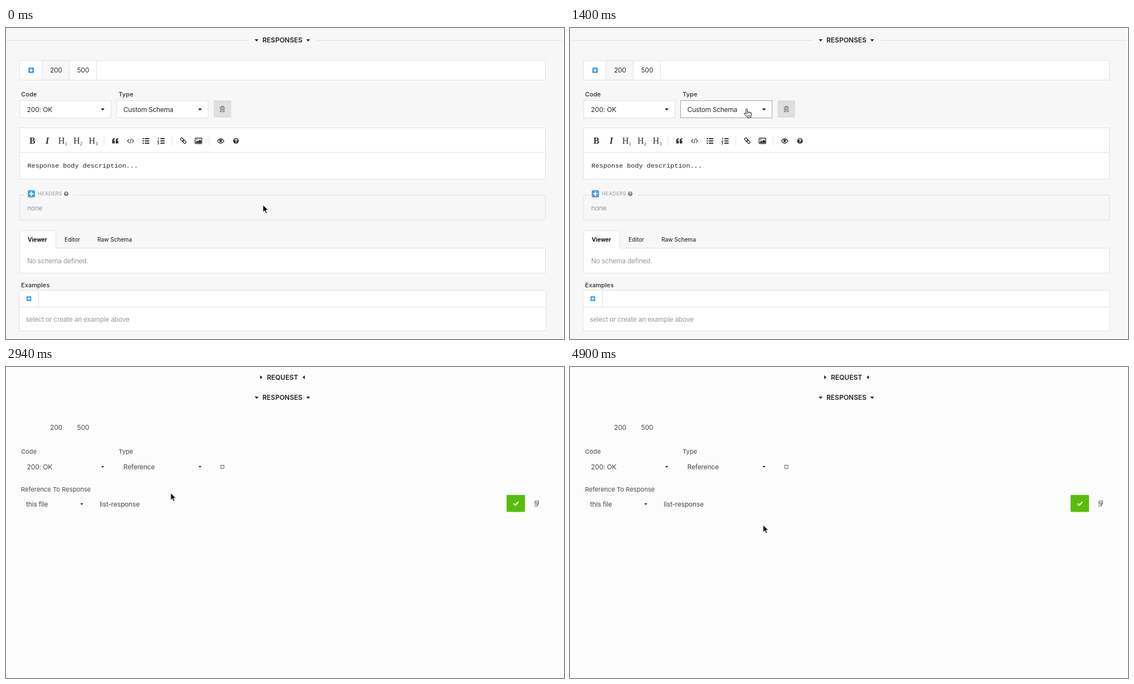
An HTML page for the animation above (4970 ms loop, 1001 by 559 pixels).

```html
<!DOCTYPE html>
<html lang="en">
<head>
<meta charset="utf-8">
<title>Response editor</title>
<style>
html, body { margin: 0; width: 100%; height: 100%; overflow: hidden; background: #f7f7f7; }
svg { display: block; width: 1001px; height: 559px; }
text { font: 12px Inter, sans-serif; letter-spacing: var(--track, -.022em); fill: var(--text, #2b2b2b); white-space: pre; }
.title { font-weight: 600; letter-spacing: 0; fill: #222; }
.label { font-size: 11px; font-weight: var(--label, 500); letter-spacing: .008em; }
.tab { font-size: 10.1px; letter-spacing: 0; fill: #111; }
.strong { font-weight: 700; fill: #111; }
.mute { fill: #999; }
.code { font: 11.8px "Liberation Mono", monospace; letter-spacing: 0; fill: #222; }
.serif { font: 16px "Liberation Serif", serif; letter-spacing: 0; fill: #2d3038; }
.tiny { font: 8px "Liberation Serif", serif; letter-spacing: 0; fill: #2d3038; }
.box { fill: #fff; stroke: #e1e1e1; }
.rule { fill: none; stroke: #e1e1e1; }
.focus { fill: #fff; stroke: #4c9fc4; stroke-width: 1.2; }
.ink { fill: #2d3038; }
.line { fill: none; stroke: #2d3038; stroke-width: 1.3; }
.white { fill: none; stroke: #fff; }
.step { opacity: 0; }
#reference { --text: #484848; --label: 400; --track: -.014em; }
</style>
</head>
<body>
<svg viewBox="0 0 1001 559">
  <defs>
    <path id="caret" d="M-3.5-2h7L0 2z" fill="#222"/>
    <g id="plus">
      <rect x="-5" y="-5" width="10" height="10" rx="1.8" fill="#4a9fe6"/>
      <path class="white" stroke-width="1.7" d="M-3 0h6M0-3v6"/>
    </g>
    <g id="help">
      <circle r="5" class="ink"/>
      <path class="white" stroke-width="1.5" d="M-1.9-1.2Q-1.7-2.9 0-2.9T1.8-1.3Q1.7-.4 0 .2V1.2M0 2.1v1.5"/>
    </g>
  </defs>

  <g id="schema">
    <rect width="1001" height="559" fill="#f7f7f7"/>
    <rect x="998" width="3" height="559" fill="#fcfcfc"/>
    <path class="rule" d="M0 22.5H435M557 22.5H998"/>

    <rect class="box" x="24.5" y="58.5" width="943" height="35"/>
    <rect x="65" y="59" width="49" height="34" fill="#f7f7f7"/>
    <path class="rule" d="M64.5 58v35M113.5 58v35M162.5 58v35"/>
    <use href="#plus" x="45" y="76"/>

    <rect class="box" x="24.5" y="130.5" width="164" height="31"/>
    <rect class="box" x="198.5" y="130.5" width="164" height="31"/>
    <rect x="372.5" y="130" width="31.5" height="31" rx="1" fill="#dfdfdf"/>
    <path fill="none" stroke="#777" stroke-width="1.2" d="M383.5 142.5h9M386.5 142v-1.5h3v1.5M384.7 142.5v8h6.6v-8M386.9 144v5M389.1 144v5"/>

    <rect class="box" x="24.5" y="179.5" width="943" height="92"/>
    <path class="rule" d="M24 223.5H968M176 194v18M297.5 194v18M364.5 194v18"/>
    <text class="serif" x="42" y="208" style="font-weight:700">B</text>
    <text class="serif" x="71" y="208" style="font-weight:700;font-style:italic">I</text>
    <g id="headings"></g>

    <path class="ink" d="M190.5 207.5v-5q0-4 4.6-4.5v2q-2 .4-2 2.5h2v5zM196.8 207.5v-5q0-4 4.6-4.5v2q-2 .4-2 2.5h2v5z"/>
    <path class="line" style="stroke-width:1.1" d="M221 200l-3.2 3 3.2 3M226 200l3.2 3-3.2 3M224.7 198.7l-2.4 8.6"/>
    <path class="line" style="stroke-width:1.9" d="M245 199h2.4M245 203h2.4M245 207h2.4M249 199h8M249 203h8M249 207h8M277 199h7.5M277 203h7.5M277 207h7.5"/>
    <path class="line" style="stroke-width:1" d="M272.5 198l1.3-.6v3M272 202.2h2l-2 2.2h2.2M272 206h2l-1 1.3q1.4 0 1 1.2t-2 .4"/>
    <g class="line" transform="translate(318 202.5) rotate(45)">
      <rect x="-6" y="-2.1" width="6.8" height="4.2" rx="2"/>
      <rect x="-.8" y="-2.1" width="6.8" height="4.2" rx="2"/>
    </g>
    <rect class="line" x="339.2" y="198" width="12" height="9.8" rx="1"/>
    <path class="ink" d="M340.5 206.8v-2l2.4-2.4 1.5 1.5 3.3-3.4 2.8 2.8v3.5z"/>
    <circle class="ink" cx="342.3" cy="200.8" r="1.1"/>
    <path class="line" d="M379.3 203q5.7-8 11.6 0-5.9 8-11.6 0z"/>
    <circle class="ink" cx="385.1" cy="202.7" r="2.4"/>
    <use href="#help" x="412.5" y="203"/>
    <text class="code" x="38.5" y="250.5">Response body description...</text>

    <path class="rule" d="M33 300.5H24.5V345.5H967.5V300.5H122"/>
    <use href="#plus" transform="translate(45.5 298) scale(1.3)"/>
    <text class="mute" x="57" y="301.3" style="font-size:9px;letter-spacing:.03em">HEADERS</text>
    <use href="#help" transform="translate(108 298) scale(.78)" opacity=".65"/>
    <text class="mute" x="38" y="327.5">none</text>

    <rect class="box" x="24.5" y="395.5" width="943" height="45"/>
    <path d="M24.5 396V364.5H89.5V396" fill="#fff" stroke="#e1e1e1"/>
    <text class="tab" x="39" y="384" style="font-weight:700">Viewer</text>
    <text class="tab" x="105" y="384">Editor</text>
    <text class="tab" x="164" y="384">Raw Schema</text>
    <text class="mute" x="38" y="423">No schema defined.</text>

    <text class="label" x="27" y="465.5">Examples</text>
    <rect class="box" x="23.5" y="471.5" width="945" height="73"/>
    <path class="rule" d="M24 501.5H968M58.5 472v29"/>
    <use href="#plus" transform="translate(41 486.5) scale(.88)"/>
    <text class="mute" x="35.5" y="527.5">select or create an example above</text>

    <rect id="hover" class="step" x="198.5" y="130.5" width="164" height="31" fill="none" stroke="#a3a3a3"/>
    <rect id="focus" class="focus step" x="198.5" y="130.5" width="164" height="31"/>
    <text x="210.5" y="150.5">Custom Schema</text>
    <use href="#caret" transform="translate(173.5 146.5) scale(.95)"/>
    <use href="#caret" transform="translate(348 146.5) scale(.95)"/>

    <g id="shared">
      <use href="#caret" x="449.5" y="22.3"/>
      <text class="title" x="460" y="26.3">RESPONSES</text>
      <use href="#caret" x="542" y="22.3"/>
      <text x="79" y="80">200</text>
      <text x="127.5" y="80">500</text>
      <text class="label" x="27" y="123.3">Code</text>
      <text class="label" x="202" y="123.3">Type</text>
      <text x="37.5" y="150.5" style="letter-spacing:-.01em">200: OK</text>
    </g>

    <g id="types" class="step">
      <rect class="focus" x="198.5" y="166.5" width="162.5" height="64" rx="1"/>
      <rect id="pick" class="step" x="199.2" y="199" width="161" height="30.7" fill="#f6f6f6"/>
      <text class="strong" x="212.5" y="188">Custom Schema</text>
      <text x="212.5" y="219">Reference</text>
    </g>
  </g>

  <g id="reference" class="step">
    <rect width="1001" height="559" fill="#fcfcfc"/>
    <use href="#caret" transform="translate(458 18.5) rotate(-90)"/>
    <text class="title" x="468" y="23">REQUEST</text>
    <use href="#caret" transform="translate(534 18.5) rotate(90)"/>
    <use href="#shared" y="33"/>
    <use href="#caret" transform="translate(173.5 179.5) scale(.75)"/>
    <use href="#caret" transform="translate(348 179.5) scale(.75)"/>
    <text x="210.5" y="183.5">Reference</text>
    <path fill="none" stroke="#666" d="M384.5 176.5h7M385.5 176.5v6h5.5v-6"/>
    <text class="label" x="27" y="224">Reference To Response</text>
    <text x="36" y="250.5">this file</text>
    <use href="#caret" transform="translate(136 246.5) scale(.75)"/>

    <g id="chosen">
      <text x="168" y="250.5">list-response</text>
      <rect x="898" y="230" width="33" height="30.5" rx="1.5" fill="#58bd0c"/>
      <path class="white" stroke-width="2.4" d="M910.8 245.5l2.8 2.8 5.6-5.8"/>
      <path fill="none" stroke="#555" stroke-width="1.1" d="M949.5 241h6l-1 3.5h-6zM948 247h6.5l1-2.5M947.5 250h5.5l1-3"/>
    </g>
    <g id="search" class="step">
      <rect x="898" y="230" width="33" height="30.5" rx="1.5" fill="#ea5541"/>
      <path class="white" stroke-width="2.8" d="M914.8 239.7v6.3M914.8 247.3v2.8"/>
      <circle cx="877.5" cy="245.5" r="3.5" class="line" style="stroke-width:1.7"/>
      <path class="line" style="stroke-width:2" d="M880 248l3.5 3.5"/>
      <text x="307" y="289.5" style="font-weight:600;letter-spacing:0;fill:#222">list-response</text>
    </g>
  </g>

  <g id="cursor">
    <path id="arrow" d="M0 0v13l3-2.8 2.2 5 2.2-1L5.2 9.300h4z" fill="#000" stroke="#fff" stroke-width=".9"/>
    <g id="hand" class="step" stroke="#111" stroke-linejoin="round">
      <path fill="#fff" d="M-1.3 7V.6Q-1.3-.6 0-.6t1.3 1.2V5q1.8-.8 2.6.4 1.8-.6 2.5.6 2-.3 2.1 1.4v2.5q0 2-1.2 3.4V15h-6.5v-1.4Q-2 12-4.6 8.4q-.4-1.4.8-1.6 1 0 2.5 2z"/>
      <path fill="none" stroke-width=".8" d="M1.3 5v3M3.9 5.4V8M6.4 6v2.3M2 10.5v2.5M4 10.5v2.5M6 10.5v2.5"/>
    </g>
  </g>
</svg>
<script>
const LOOP = 4970, TICK = 70;
const $ = id => document.getElementById(id);

$("headings").innerHTML = [1, 2, 3].map(n => {
  const x = 66.5 + 27.3 * n;
  return `<text class="serif" x="${x}" y="208">H</text><text class="tiny" x="${x + 12}" y="210.5">${n}</text>`;
}).join("");

// Shown during each [from, to) span, hidden otherwise.
function show(id, ...spans) {
  const at = t => spans.some(([a, b]) => t >= a && t < b) ? 1 : 0;
  const times = [...new Set([0, ...spans.flat(), LOOP])].sort((a, b) => a - b);
  $(id).animate(times.map(t => ({ offset: t / LOOP, opacity: at(t), easing: "step-end" })),
    { duration: LOOP, iterations: Infinity });
}

function move(id, path) {
  const keys = path.map(([t, x, y], i) => {
    const ticks = i + 1 < path.length ? (path[i + 1][0] - t) / TICK : 1;
    return { offset: t / LOOP, transform: `translate(${x}px, ${y}px)`, easing: `steps(${Math.round(ticks)}, end)` };
  });
  $(id).animate(keys, { duration: LOOP, iterations: Infinity });
}

const OPEN = 1470, SWAP = 2380, CLEAR = 3360, CHOOSE = 4480;

show("hover", [630, OPEN]);
show("focus", [OPEN, SWAP]);
show("types", [OPEN, SWAP]);
show("pick", [1960, SWAP]);
show("reference", [SWAP, LOOP]);
show("chosen", [0, CLEAR], [CHOOSE, LOOP]);
show("search", [CLEAR, CHOOSE]);
show("hand", [630, SWAP], [3850, CHOOSE]);
show("arrow", [0, 630], [SWAP, 3850], [CHOOSE, LOOP]);

move("cursor", [
  [0, 461, 318], [70, 461, 318], [280, 420, 262], [560, 328, 172], [770, 317, 146],
  [1540, 317, 146], [1890, 286, 196], [2100, 276, 213], [2520, 276, 213],
  [2800, 295.5, 226.5], [3220, 295.5, 226.5], [3360, 300, 236], [3570, 318, 244],
  [3710, 318, 244], [3990, 342, 277], [4480, 342, 277], [4760, 346.5, 284], [LOOP, 346.5, 284]
]);
</script>
</body>
</html>
```
